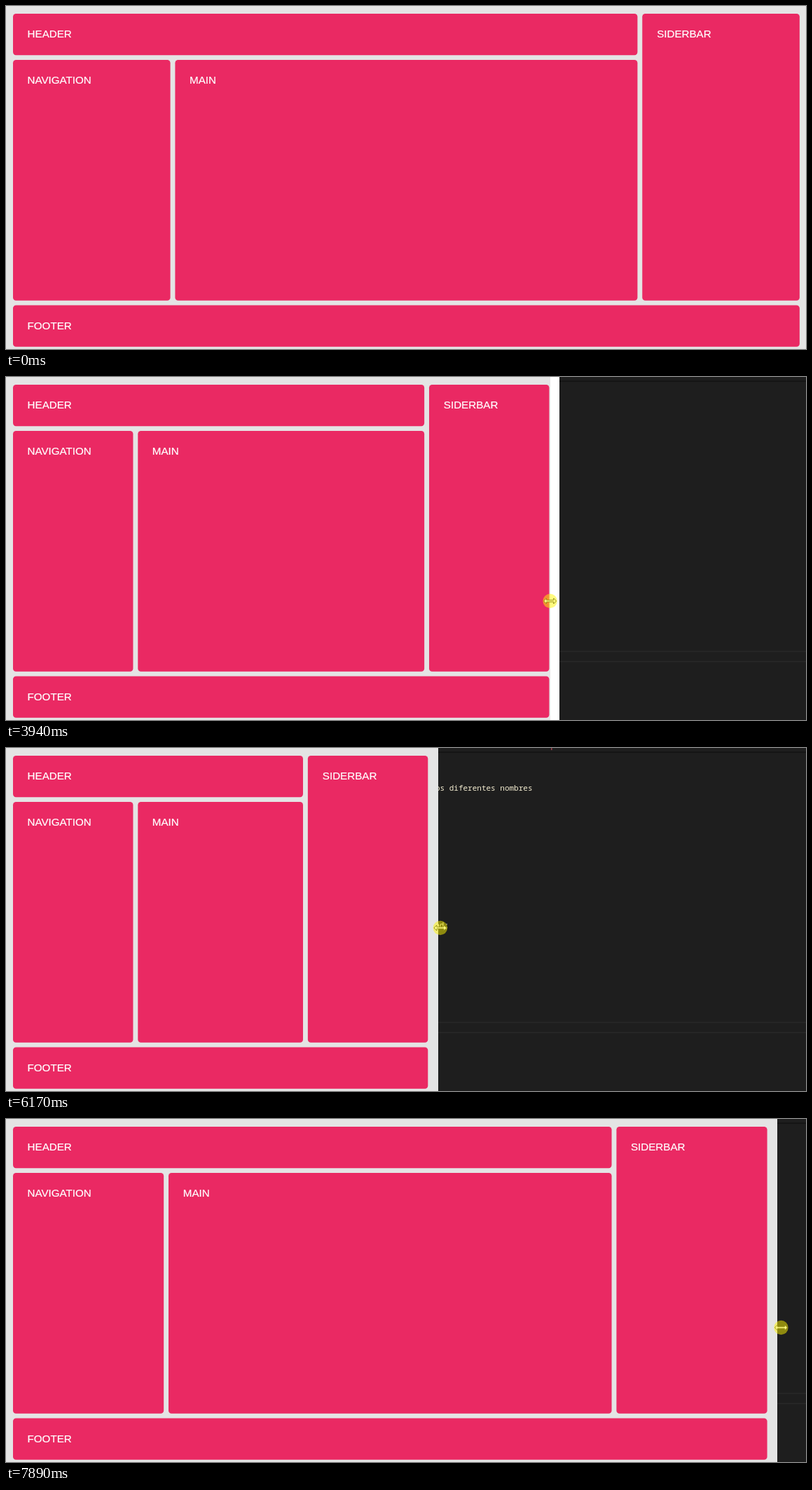
Recreate the animation shown at these times as an HTML page. Size 1142 by 490 pixels, loop 8 s.

```html
<!DOCTYPE html>
<html lang="es">
<head>
<meta charset="utf-8">
<title>Responsive grid</title>
<style>
  html, body { margin: 0; width: 100%; height: 100%; overflow: hidden; background: #1e1e1e; }
  svg, #page, #paint, #grid { position: absolute; left: 0; top: 0; }
  svg { width: 1142px; height: 490px; }
  #editor text { font: 11px "Noto Sans Mono", monospace; fill: #f3ecd0; text-anchor: end; }
  #page { height: 490px; background: #fff; }
  #paint { height: 490px; background: #e4e4e4; }
  #grid {
    left: 10.3px; top: 10.6px; display: grid; gap: 8px;
    grid-template: 69px 401px 69px / max(200px, 20%) 1fr max(200px, 20%);
    transform: scale(calc(6 / 7)); transform-origin: 0 0;
    font: 17.7px/21px "Liberation Sans", Arial, sans-serif; color: #fff;
    -webkit-text-stroke: .25px #fff;
  }
  #grid > * { padding: 24px; border-radius: 5px; background: #ea2963; min-width: 0; box-sizing: border-box; }
  header { grid-area: 1 / 1 / 2 / 3; }
  aside { grid-area: 1 / 3 / 3 / 4; }
  nav { grid-area: 2 / 1; }
  main { grid-area: 2 / 2; }
  footer { grid-area: 3 / 1 / 4 / 4; }
</style>
</head>
<body>
<svg id="editor">
  <path d="M0 6H1142" stroke="#151515" stroke-width="2"/>
  <path d="M0 392H1142M0 406.5H1142" stroke="#292929" stroke-width="1.5"/>
  <text x="784" y="0" style="fill:#e0556a">p</text>
  <text x="751.5" y="61">los diferentes nombres</text>
  <text x="632" y="257">end;</text>
  <text x="612" y="275">;</text>
</svg>
<div id="page">
  <div id="paint"></div>
  <div id="grid">
    <header>HEADER</header>
    <aside>SIDERBAR</aside>
    <nav>NAVIGATION</nav>
    <main>MAIN</main>
    <footer>FOOTER</footer>
  </div>
</div>
<svg>
  <g id="cursor">
    <path d="M-9 0L-5-4V-1.2H5V-4L9 0L5 4V1.2H-5V4Z" fill="#fff" stroke="#222" stroke-width=".9"/>
    <circle r="10.2" fill="#fff500" fill-opacity=".5"/>
  </g>
</svg>
<script>
const LOOP = 8000, STEP = 171.43, APPEAR = 7;
// The drag: step, page width, cursor height
const drag = [
  [-1, 1147.5, 326], [11, 1147.5, 326], [13, 1130, 335], [18, 1030, 331], [23, 790, 320],
  [30, 609, 257], [32, 593, 257], [33, 593, 257], [36, 617, 257], [42, 932, 306],
  [46, 1101, 298], [48, 1140, 298]
];
const el = id => document.getElementById(id);

const slope = (i, c) => (drag[i + 1][c] - drag[i][c]) / (drag[i + 1][0] - drag[i][0]);

// Harmonic mean of both sides keeps the curve from overshooting.
function tangent(i, c) {
  if (i === 0 || i === drag.length - 1) return 0;
  const a = slope(i - 1, c), b = slope(i, c);
  return a * b > 0 ? 2 * a * b / (a + b) : 0;
}

function sample(n, c) {
  const i = drag.findIndex(k => k[0] > n) - 1;
  const p = drag[i], q = drag[i + 1], span = q[0] - p[0], u = (n - p[0]) / span;
  return p[c] + (q[c] - p[c]) * u * u * (3 - 2 * u)
    + span * u * (1 - u) * ((1 - u) * tangent(i, c) - u * tangent(i + 1, c));
}

// The page trails the cursor by an amount that grows with its speed.
function lead(n) {
  const speed = (sample(n + .1, 1) - sample(n - .1, 1)) / .2;
  return speed < 0 ? -speed * speed / 87 : speed / 5;
}

function draw(now) {
  const n = Math.floor((now % LOOP + 18) / STEP);
  const width = sample(n, 1), x = width + lead(n);
  el("page").style.width = width + "px";
  el("paint").style.width = Math.min(width, x) + "px";
  el("grid").style.width = (width - 24.3) * 7 / 6 + "px";
  el("cursor").setAttribute("transform", `translate(${x} ${sample(n, 2)})`);
  el("cursor").style.visibility = n < APPEAR ? "hidden" : "visible";
  requestAnimationFrame(draw);
}
requestAnimationFrame(draw);
</script>
</body>
</html>
```
